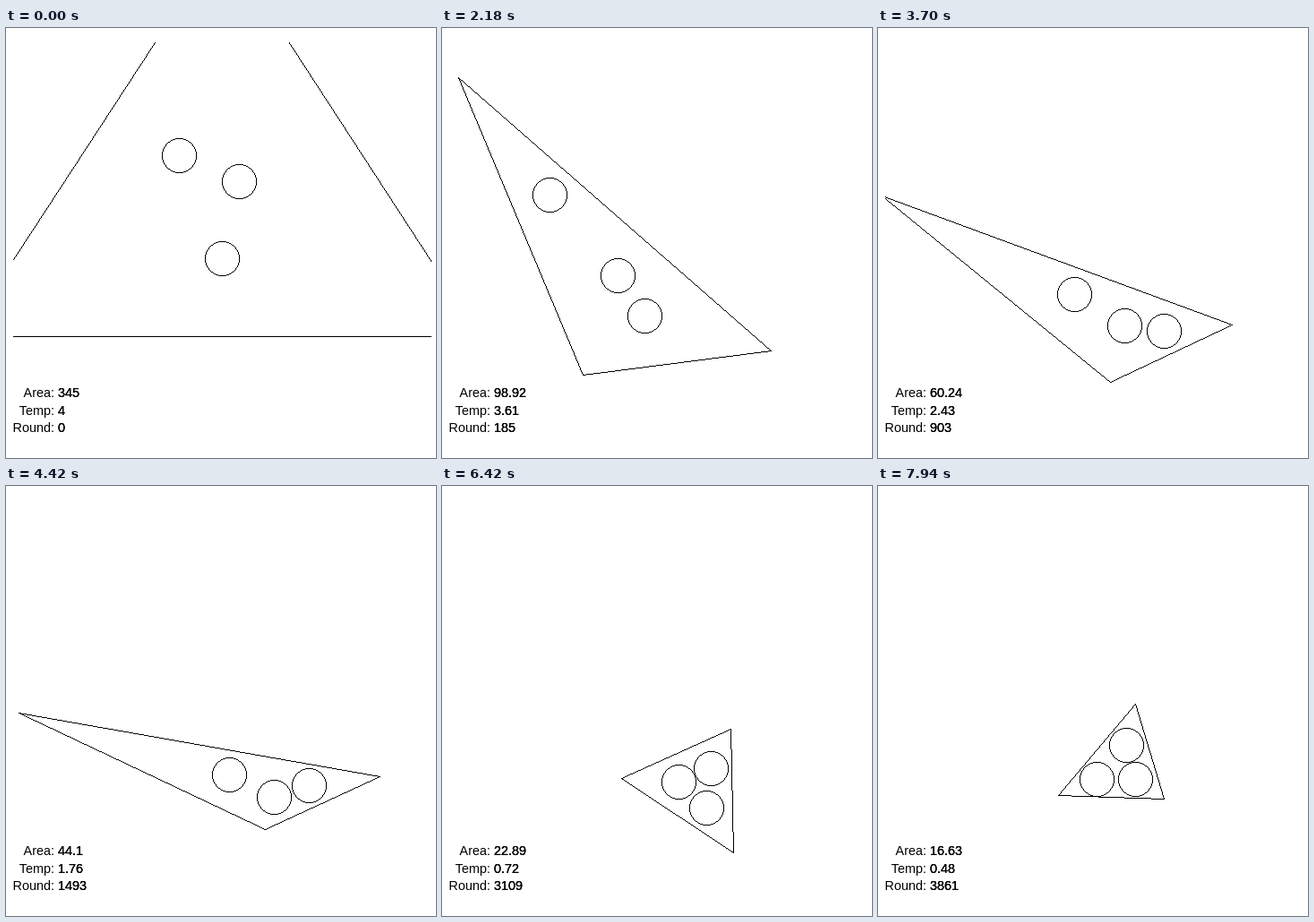
An HTML page with a canvas for the animation above (8000 ms loop, 480 by 480 pixels).

```html
<!DOCTYPE html>
<html lang="en">
<head>
<meta charset="utf-8">
<title>Annealed triangle</title>
<style>
  html, body { margin: 0; width: 100%; height: 100%; overflow: hidden; background: #fff; }
  canvas, svg { position: absolute; left: 0; top: 0; width: 100vw; height: 100vh; }
  canvas { image-rendering: pixelated; }
  text { font: 14.4px "Liberation Sans", Arial, sans-serif; fill: #000; }
  .label { text-anchor: end; }
</style>
</head>
<body>
<canvas width="480" height="480"></canvas>
<svg viewBox="0 0 480 480"></svg>
<script>
const LOOP = 8000, HOLD = 500, STEP = 80, LAST = 94;
const RADIUS = 19, UNIT_AREA = 371;
const PANEL = { left: 8, right: 475, top: 16 };

// Key poses; corners run left, bottom, right
const poses = [
  { step: 0, round: 0, corners: [241.7, -99, -47.6, 344.5, 529.6, 344.5],
    centres: [193.5, 142.5, 260.5, 171.5, 241.5, 257.5] },
  { step: 11, round: 73, corners: [49.6, -17.79, 81.5, 381.5, 352.5, 392.5],
    centres: [91.5, 108.5, 179.5, 273.5, 190.5, 323.5] },
  { step: 33, round: 469, corners: [-6.6, 132.43, 238.3, 398.2, 381.2, 335.8],
    centres: [179.5, 282.5, 235.5, 306.5, 299.5, 332.5] },
  { step: 50, round: 1493, corners: [14.5, 253.5, 289.5, 383.15, 417.5, 324.5],
    centres: [249.5, 322.5, 299.5, 347.5, 338.5, 334.5] },
  { step: 60, round: 2149, corners: [115.5, 279.5, 287.5, 387.55, 395.5, 326.5],
    centres: [218.5, 321.5, 258.5, 345.5, 319.5, 344.5] },
  { step: 75, round: 3109, corners: [200.5, 326.5, 325.5, 409.36, 322.5, 271.5],
    centres: [264.5, 330.5, 295.5, 359.5, 300.5, 315.5] },
  { step: LAST, round: 3861, corners: [201.5, 345.5, 319.5, 349.5, 287.5, 243.84],
    centres: [244.5, 327.5, 287.5, 327.5, 277.5, 289.5] }
];

const lerp = (a, b, u) => a + (b - a) * u;
const rand = n => { const s = Math.sin(n * 127.1 + 31.7) * 43758.5453; return s - Math.floor(s); };
const points = v => [0, 2, 4].map(i => [v[i], v[i + 1]]);

// Straight drift between two poses with a random wobble that fades at both
function wander(from, to, u, size, seed) {
  const wobble = size * Math.sin(Math.PI * u);
  return points(from.map((a, k) => lerp(a, to[k], u) + wobble * (2 * rand(seed + k) - 1)));
}

// Smooth counter: cubic between poses, slopes from the neighbouring spans
const span = i => poses[i + 1].step - poses[i].step;
const rate = i => (poses[i + 1].round - poses[i].round) / span(i);
function slope(i) {
  const end = poses.length - 1;
  if (i === 0) return 2 * rate(0) - slope(1);
  if (i === end) return 2 * rate(end - 1) - slope(end - 1);
  return (span(i) * rate(i - 1) + span(i - 1) * rate(i)) / (span(i - 1) + span(i));
}
function roundAt(i, u) {
  const v = 1 - u;
  return Math.round(lerp(poses[i].round, poses[i + 1].round, u * u * (3 - 2 * u))
    + span(i) * u * v * (v * slope(i) - u * slope(i + 1)));
}

function areaOf([[ax, ay], [bx, by], [cx, cy]]) {
  return Math.abs((bx - ax) * (cy - ay) - (by - ay) * (cx - ax)) / 2 / UNIT_AREA;
}

// Keep the circles inside the triangle and apart from each other
function settle(dots, tri) {
  for (let pass = 0; pass < 40; pass++) {
    dots.forEach((d, i) => {
      for (const e of dots.slice(i + 1)) {
        const dx = e[0] - d[0], dy = e[1] - d[1], gap = Math.hypot(dx, dy) || 1;
        const push = Math.max(0, 2 * RADIUS - gap) / 2 / gap;
        d[0] -= dx * push; d[1] -= dy * push;
        e[0] += dx * push; e[1] += dy * push;
      }
    });
    for (const d of dots) tri.forEach((p, i) => {
      const q = tri[(i + 1) % 3], len = Math.hypot(q[0] - p[0], q[1] - p[1]);
      const nx = (q[1] - p[1]) / len, ny = (p[0] - q[0]) / len;
      const push = Math.max(0, RADIUS - (d[0] - p[0]) * nx - (d[1] - p[1]) * ny);
      d[0] += nx * push; d[1] += ny * push;
    });
  }
}

// One-pixel outlines without smoothing
const canvas = document.querySelector("canvas");
const ctx = canvas.getContext("2d");
const snap = point => point.map(Math.floor);

function plot(x, y) {
  if (x >= PANEL.left && x < PANEL.right && y >= PANEL.top) ctx.fillRect(x, y, 1, 1);
}
function line([x0, y0], [x1, y1]) {
  const n = Math.max(Math.abs(x1 - x0), Math.abs(y1 - y0));
  for (let k = 0; k <= n; k++) plot(Math.round(lerp(x0, x1, k / n)), Math.round(lerp(y0, y1, k / n)));
}
function circle([x, y]) {
  for (let a = 0; a <= RADIUS * Math.SQRT1_2; a++) {
    const b = Math.round(Math.sqrt(RADIUS * RADIUS - a * a));
    for (const [p, q] of [[a, b], [b, a]])
      for (const sx of [-1, 1]) for (const sy of [-1, 1]) plot(x + sx * p, y + sy * q);
  }
}

function addText(x, y, className, content = "") {
  const node = document.createElementNS("http://www.w3.org/2000/svg", "text");
  node.setAttribute("x", x);
  node.setAttribute("y", y);
  node.setAttribute("class", className);
  node.textContent = content;
  return document.querySelector("svg").appendChild(node);
}
// Values are overprinted, which thickens their edges
const values = [["Area:", 412], ["Temp:", 432], ["Round:", 451]].map(([name, y]) => {
  addText(54, y, "label", name);
  return [1, 2, 3].map(() => addText(58, y, "value"));
});

function draw(step) {
  let i = 0;
  while (i < poses.length - 2 && step >= poses[i + 1].step) i++;
  const from = poses[i], to = poses[i + 1];
  const u = (step - from.step) / span(i);

  const round = roundAt(i, u);
  const temp = 4 * Math.exp(-0.00055 * round);
  const tri = wander(from.corners, to.corners, u, 2 * temp, step * 17);
  const dots = wander(from.centres, to.centres, u, 5 * temp, step * 17 + 7);
  if (u > 0 && u < 1) settle(dots, tri);

  ctx.clearRect(0, 0, canvas.width, canvas.height);
  tri.forEach((p, k) => line(snap(p), snap(tri[(k + 1) % 3])));
  dots.forEach(d => circle(snap(d)));
  [areaOf(tri), temp, round].forEach((v, k) => {
    for (const node of values[k]) node.textContent = +v.toFixed(2);
  });
}

let shown = -1;
function tick() {
  const t = performance.now() % LOOP;
  const step = t < HOLD ? 0 : Math.min(LAST, 1 + Math.floor((t - HOLD) / STEP));
  if (step !== shown) draw(shown = step);
  requestAnimationFrame(tick);
}
tick();
</script>
</body>
</html>
```
